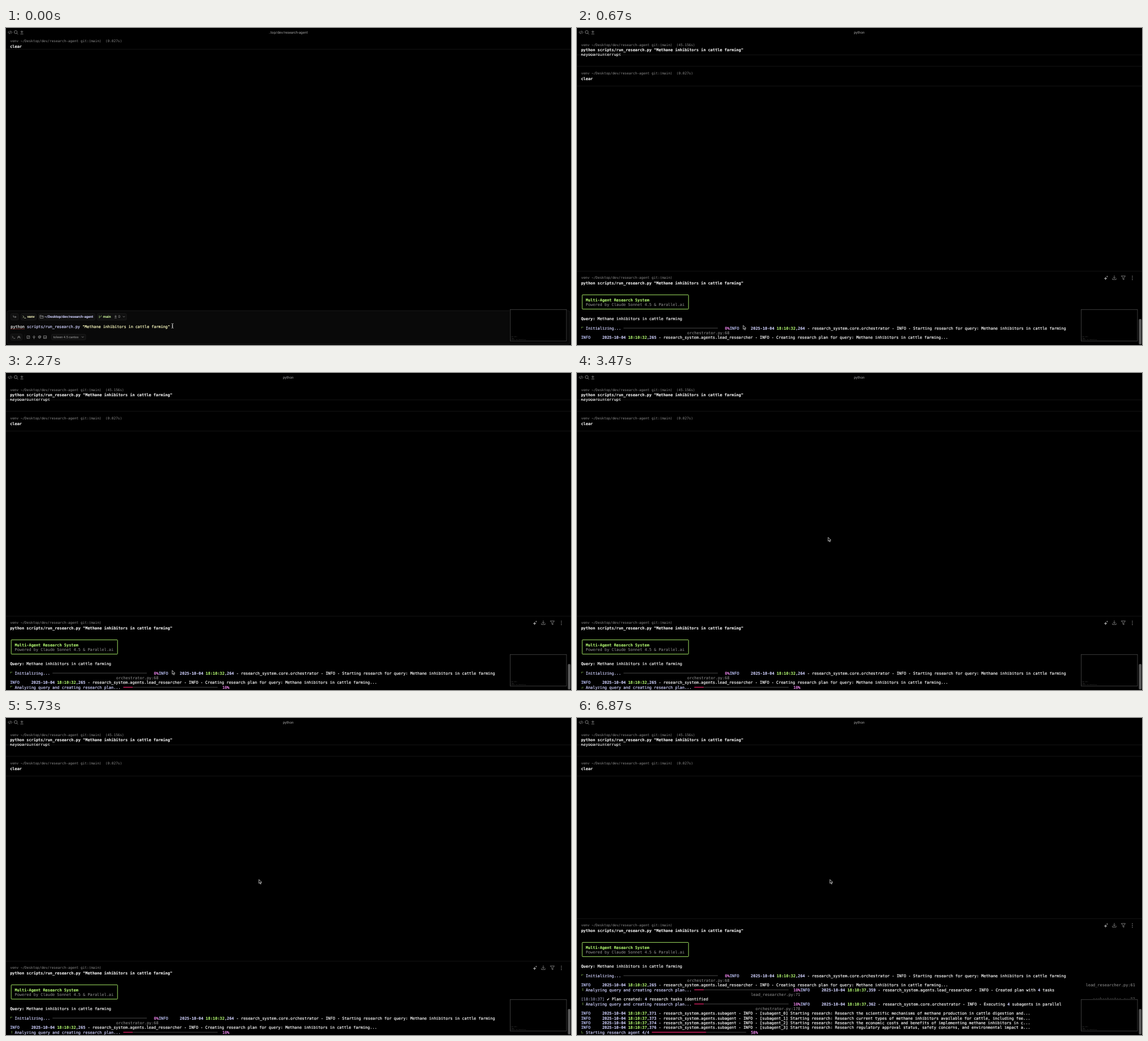
Animation, 999 px wide and 560 px high, one loop 7 s. Source, as an HTML page:

```html
<!DOCTYPE html>
<html lang="en">
<head>
<meta charset="utf-8">
<title>Terminal session</title>
<style>
  html, body { margin: 0; width: 100%; height: 100%; overflow: hidden; background: #000; }
  svg { display: block; width: 999px; height: 560px; }
  text, tspan { fill: currentColor; stroke: currentColor; stroke-width: .2; }
  text { font: 6.926px "DejaVu Sans Mono", monospace; color: #f6f6f6; white-space: pre; text-rendering: geometricPrecision; }
  .ui { font: 6.25px Roboto, sans-serif; color: #a2a2a2; stroke: none; }
  .head { font-size: 6.08px; color: #8c8c8c; stroke: none; }
  .b { font-weight: 700; stroke-width: .1; }
  .blue { color: #c3c9fe; }
  .cyan { color: #d0d1fe; }
  .green { color: #b4fa72; }
  .yellow { color: #fefdc2; }
  .pink { color: #ff8ffd; }
  .dim { color: #999; stroke: none; }
  .stamp { color: #8a8ba8; }
  .tiny { font-size: 2px; color: #555; stroke: none; }
  .icon { fill: none; stroke: #8e8e8e; stroke-width: .8; stroke-linecap: round; stroke-linejoin: round; }
  .sep { stroke: #171717; stroke-width: .8; }
  .chip { fill: #101010; stroke: #222; stroke-width: .6; }
</style>
</head>
<body>
<svg id="stage" viewBox="0 0 999 560"></svg>
<script>
const LOOP = 7000, FPS = 15;
const CELL = 4.17, LINE = 25 / 3, LEFT = 7.2;
const TOPIC = 'Methane inhibitors in cattle farming';
const COMMAND = `python scripts/run_research.py "${TOPIC}"`;
const PROMPT = 'venv ~/Desktop/dev/research-agent git:(main)';
const PLANNING = 'Analyzing query and creating research plan...';
const SPINNER = [0x0B, 0x19, 0x39, 0x38, 0x3C, 0x34, 0x26, 0x27, 0x07, 0x0F];

const colX = col => LEFT + col * CELL;
const rowY = row => 466 + row * LINE;
const text = (x, y, body, cls = '', extra = '') => `<text x="${x}" y="${y}" class="${cls}" ${extra}>${body}</text>`;
const span = (cls, body) => `<tspan class="${cls}">${body}</tspan>`;
const cells = (col, row, body, cls) => text(colX(col), rowY(row), body, cls);
const icon = (d, extra = '') => `<path class="icon" d="${d}" ${extra}/>`;
const rule = y => `<path class="sep" d="M0 ${y}H999"/>`;
const chip = (x, y, w, h) => `<rect class="chip" x="${x}" y="${y}" width="${w}" height="${h}" rx="2"/>`;
const group = (id, body) => `<g id="${id}">${body}</g>`;

// Braille spinner cell: six bits, two columns of three dots.
function dots(row, bits) {
  let out = '';
  for (let i = 0; i < 6; i++) {
    if (bits >> i & 1) {
      const x = LEFT + 1 + Math.floor(i / 3) * 2, y = rowY(row) - 4.4 + (i % 3) * 1.6;
      out += `<circle cx="${x}" cy="${y}" r=".55" fill="#b4fa72"/>`;
    }
  }
  return out;
}

function progress(row, label, percent) {
  const start = 2 + label.length + 1, x = colX(start), y = rowY(row) - 2.5;
  const width = 40 * CELL, done = Math.round(percent * .8) / 2 * CELL;
  return cells(2, row, label, 'cyan')
    + `<path d="M${x + done} ${y}h${width - done}" stroke="#484848"/>`
    + (done ? `<path d="M${x} ${y}h${done}" stroke="#f92672" stroke-width="1.2"/>` : '')
    + cells(start + 41, row, `${percent}%`.padStart(4), 'pink');
}

function log(col, row, second, milli, module, message) {
  const marked = message
    .replace(/ (\d) /, (_, n) => ' ' + span('b cyan', n) + ' ')
    .replace(/^\[(\w+)\]/, (_, name) => span('b', '[') + name + span('b', ']'));
  return cells(col, row, span('blue', 'INFO') + '     '
    + span('b cyan', '2025-10-04') + ' ' + span('b green', '18:10:' + second) + span('b cyan', ',' + milli)
    + ` - research_system.${module} - INFO - ${marked}`);
}

function topBar() {
  return icon('M5.6 5.8L3.6 7.7l2 1.9M9 5.8l2 1.9-2 1.9M8 5.2L6.7 10.2')
    + icon('M14.4 7.2a2.7 2.7 0 1 0 5.4 0a2.7 2.7 0 1 0-5.4 0M19.1 9.2l2 2')
    + icon('M28 4.8v4M26 6.8h4M25.8 10.6h4.4')
    + text(499, 9.8, '', 'ui', 'id="title" text-anchor="middle"');
}

function prompt() {
  return text(7.5, 25, PROMPT + '  (0.027s)', 'head') + text(LEFT, 35.1, 'clear', 'b') + rule(37.5)
    + '<rect x="2" y="499.5" width="995" height="59" rx="3" fill="#090909" stroke="#1c1c1c" stroke-width=".8"/>'
    + chip(8.5, 504.5, 13.5, 11.5) + icon('M13 508v2.5h4.6M16.2 508.9l1.6 1.6-1.6 1.6')
    + chip(26.5, 504.5, 27, 11.5) + icon('M30 508.5l1.7 1.7-1.7 1.7M32.5 512.4h2.4', 'style="stroke:#d8e6b4"')
    + text(37.5, 512.2, 'venv', 'ui b yellow')
    + chip(57.5, 504.5, 100, 11.5) + icon('M60.4 507.6h2.2l.8 1h2.5v4h-5.5zM60.4 509.6h5.5')
    + text(68, 512.2, '~/Desktop/dev/research-agent', 'ui b cyan', 'style="font-size:6.2px"')
    + chip(161, 504.5, 52, 11.5) + icon('M165 508v4.4M168.5 508v1q0 1.2-3.5 1.8', 'style="stroke:#8fb56a"')
    + text(171.5, 512.2, 'main', 'ui b', 'style="color:#cdf59c"')
    + icon('M193.8 507.8v3M192.3 509.3h3M192.3 512.2h3') + text(198.4, 512.2, '0', 'ui')
    + icon('M207 509.4l1.4 1.4 1.4-1.4')
    + text(8.3, 529.8, 'python ' + span('cyan', 'scripts/run_research.py') + ' '
      + span('yellow', `"${TOPIC}"`), '', 'style="font-size:6.79px"')
    + '<path d="M8.5 531.6H33" stroke="#d0524a" stroke-width=".8" stroke-dasharray="1.6 1.2"/>'
    + chip(8, 540.5, 20.5, 11) + icon('M11 544.4l1.6 1.6-1.6 1.6M13.4 548.2h2.4')
    + icon('M20.6 548.2l1-3.6h2.4l1 3.6M21.4 546.4h2.8')
    + '<path class="sep" d="M33 541v10"/>'
    + icon('M37.4 543.8h4.4v4.6h-4.4zM40.6 545l-2 2.2')
    + icon('M48.6 544.2q.9-1.4 1.8 0v1.8q-.9 1.2-1.8 0zM47.6 546q1.9 3 3.8 0M49.5 547.6v1.4')
    + icon('M60.7 546a1.2 1.2 0 1 0-2.4 0a1.2 1.2 0 1 0 2.4 0q.6 1.6 1.2 0a2.4 2.4 0 1 0-1.2 2')
    + icon('M66.8 543.8h4.8v4.6h-4.8zM67 547.6l1.6-1.6 1.2 1 1.6-1.2')
    + chip(80.5, 541, 60.5, 10) + text(83.5, 547.9, 'tolwen 4.5 cantos', 'ui', 'style="font-size:5.7px"')
    + icon('M134 545.2l1.6 1.6 1.6-1.6');
}

function history() {
  return text(7.5, 31.5, PROMPT + '  (45.156s)', 'head') + text(LEFT, 41.4, COMMAND, 'b')
    + rule(47.5) + '<clipPath id="under"><path d="M0 45.5H200V52H0z"/></clipPath>'
    + text(LEFT, 48.8, 'KeyboardInterrupt', '', 'clip-path="url(#under)"')
    + rule(67.5) + text(7.5, 82.1, PROMPT + '  (0.027s)', 'head') + text(LEFT, 92, 'clear', 'b') + rule(102.5)
    + '<rect x="993.5" y="514" width="4.5" height="45" rx="2" fill="#5a5a5a"/>';
}

function blockHead() {
  return rule(429.5) + text(7.5, 443.4, PROMPT, 'head') + text(LEFT, 453.3, COMMAND, 'b')
    + '<path d="M934.6 439.6l.9 2 2 .9-2 .9-.9 2-.9-2-2-.9 2-.9zM937.4 437.4l.5 1.2 1.2.5-1.2.5-.5 1.2-.5-1.2-1.2-.5 1.2-.5z" fill="#999"/>'
    + icon('M950 437.6v4.6M948.2 440.6l1.8 1.8 1.8-1.8M946.8 442.6v1.8h6.4v-1.8')
    + icon('M962.6 438h7l-2.6 3.4v3.4l-1.8-1v-2.4z')
    + [438.4, 441.4, 444.4].map(y => `<circle cx="982" cy="${y}" r=".75" fill="#999"/>`).join('');
}

function firstOutput() {
  return '<rect x="9.2" y="471.4" width="188" height="25.2" rx=".8" fill="none" stroke="#9fe060"/>'
    + cells(2, 2, 'Multi-Agent Research System', 'b green')
    + cells(2, 3, 'Powered by Claude Sonnet 4.5 &amp; Parallel.ai', 'dim')
    + cells(0, 6, span('b', 'Query:') + ' ' + TOPIC)
    + dots(8, SPINNER[0]) + progress(8, 'Initializing...', 0)
    + log(63, 8, '32', 264, 'core.orchestrator', 'Starting research for query: ' + TOPIC)
    + cells(45, 9, 'orchestrator.py:68', 'dim')
    + log(0, 10, '32', 265, 'agents.lead_researcher', `Creating research plan for query: ${TOPIC}...`)
    + cells(214, 10, 'lead_researcher.py:61', 'dim');
}

function secondOutput() {
  const tasks = [
    [371, 'the scientific mechanisms of methane production in cattle digestion and...'],
    [373, 'current types of methane inhibitors available for cattle, including fee...'],
    [374, 'the economic costs and benefits of implementing methane inhibitors in c...'],
    [376, 'regulatory approval status, safety concerns, and environmental impact a...']
  ];
  return dots(11, SPINNER[3]) + progress(11, PLANNING, 10)
    + log(93, 11, '37', 359, 'agents.lead_researcher', 'Created plan with 4 tasks')
    + cells(72, 12, 'lead_researcher.py:71', 'dim')
    + cells(0, 13, '[18:10:37]', 'stamp') + cells(11, 13, '✔')
    + cells(13, 13, `Plan created: ${span('b cyan', 4)} research tasks identified`)
    + cells(217, 13, 'orchestrator.py:92', 'dim')
    + dots(14, SPINNER[3]) + progress(14, PLANNING, 10)
    + log(93, 14, '37', 362, 'core.orchestrator', 'Executing 4 subagents in parallel')
    + cells(74, 15, 'orchestrator.py:178', 'dim')
    + tasks.map(([milli, task], i) =>
      log(0, 16 + i, '37', milli, 'agents.subagent', `[subagent_${i}] Starting research: Research ${task}`)).join('');
}

function preview() {
  return '<rect x="890" y="495.6" width="102.5" height="59"/>'
    + '<rect x="891.5" y="497.3" width="99.5" height="55.7" fill="none" stroke="#4a4a4a" stroke-width=".8"/>'
    + text(892.5, 546, 'venv main', 'tiny') + text(892.5, 548.6, 'clear', 'tiny')
    + text(892.5, 551, 'python run_research.py', 'tiny');
}

const stage = document.getElementById('stage');
stage.innerHTML = '<rect width="999" height="560"/>' + topBar() + group('prompt', prompt()) + group('history', history())
  + group('block', blockHead() + group('first', firstOutput()) + group('second', secondOutput())
    + group('planning', progress(11, PLANNING, 10)) + group('research', progress(20, 'Starting research agent 4/4', 58))
    + group('spinner', ''))
  + preview()
  + group('beam', '<path d="M292.6 522.2q1.8 0 1.8 1.2v5.6q0 1.2-1.8 1.2M296.2 522.2q-1.8 0-1.8 1.2v5.6q0 1.2 1.8 1.2M293.4 526.6h2" fill="none" stroke="#ddd" stroke-width=".8"/>')
  + group('arrow', '<path d="M.4 .4V7.2L2 5.8 3.1 8.3 4.3 7.8 3.2 5.3H5.3z" fill="#000" stroke="#e4e4e4" stroke-width=".8" stroke-linejoin="round"/>');

const part = {};
for (const el of stage.querySelectorAll('[id]')) part[el.id] = el;
const show = (id, on) => part[id].setAttribute('display', on ? 'inline' : 'none');
const move = (id, x, y) => part[id].setAttribute('transform', `translate(${x} ${y})`);

function update(time) {
  const t = Math.floor((time + 4) * FPS / 1000) * 1000 / FPS + 1;
  const submitted = t > 66, output = t > 666, planning = t > 733 && t < 5800;
  const planned = t > 5800, research = t > 5866;

  part.title.textContent = t > 133 ? 'python' : '..top/dev/research-agent';
  show('prompt', !submitted);
  show('history', submitted);
  show('block', submitted);
  show('first', output);
  show('second', planned);
  show('planning', planning);
  show('research', research);
  move('block', 0, planned ? -9 * LINE : output ? 0 : 11 * LINE);

  // The spinner advances every 80 ms but is only redrawn every 100 ms.
  const redraw = Math.floor((t - 15) / 100) * 100 + 15;
  const bits = SPINNER[Math.floor(Math.max(0, redraw - 610) / 80) % SPINNER.length];
  part.spinner.innerHTML = planning || research ? dots(research ? 20 : 11, bits) : '';

  const u = Math.min(1, Math.max(0, (t - 2800) / 730));
  const ease = u * u * (3 - 2 * u);
  show('beam', t < 200);
  show('arrow', t >= 200);
  move('arrow', 293.5 + 153.3 * ease, 525 - 240 * ease);
}

const began = performance.now();
function tick() {
  update((performance.now() - began) % LOOP);
  requestAnimationFrame(tick);
}
tick();
</script>
</body>
</html>
```
